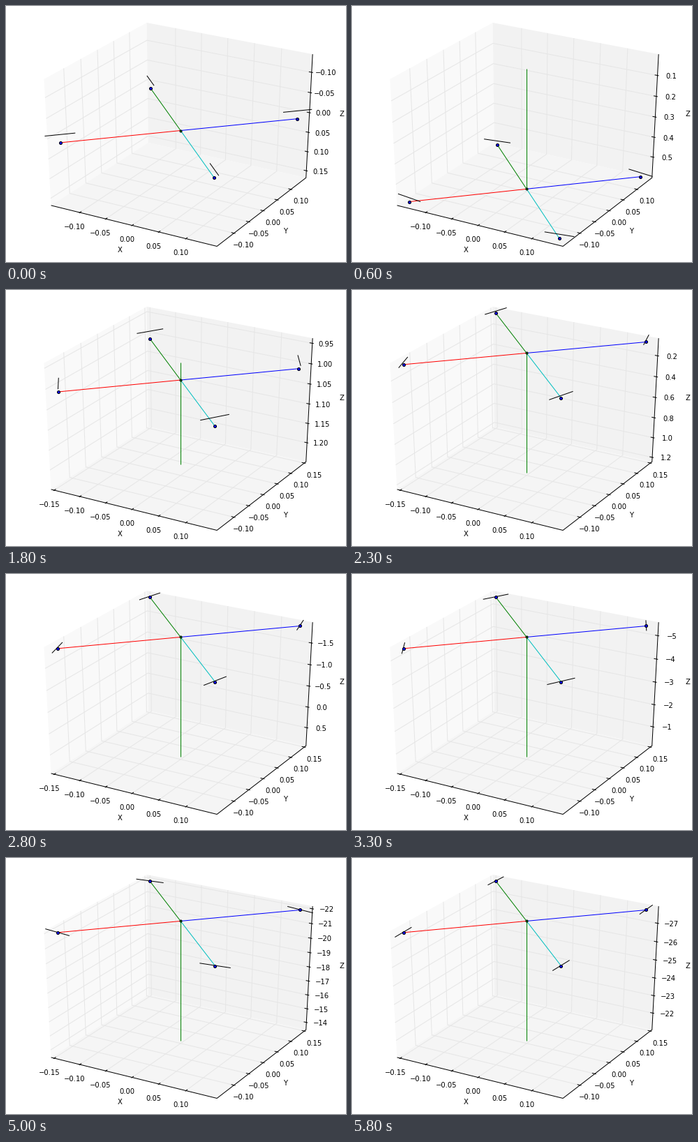
These frames come from a looping animation (487 px wide and 367 px high, 5.9 s). A matplotlib script:

```python
import numpy as np
import matplotlib.pyplot as plt
from matplotlib.animation import FuncAnimation

W, H = 487, 367
FRAMES, DT, TRAIL = 59, 0.05, 10
PX = 0.72                      # points per pixel at 100 dpi
LIMIT, ARM, BLADE, MAST = 0.15, 0.2, 0.025, 0.02
EDGE = 0.5 + 1 / 48            # half size of the box around the unit cube
LO, HI = -0.095, 0.09          # view window

plt.rcParams["font.family"] = "DejaVu Sans"
fig = plt.figure(figsize=(W / 100, H / 100), dpi=100, facecolor="white")
ax = fig.add_axes([0, 0, 1, 1])

# Flight: gravity pulls down (+z), the rotors push up.
SUB = 100
time = np.arange(0, (FRAMES + 1) * SUB) * DT / SUB
lift = np.interp(time,
                 [0, 0.30, 0.34, 0.70, 1.20, 1.70, 1.75, 2.02, 2.05],
                 [0, 0, 15.6, 18.5, 25, 45, 21, 14, 0])
impulse = np.cumsum(lift) * DT / SUB
height = np.cumsum(9.81 * time - impulse) * DT / SUB
steps = (np.arange(FRAMES) + 1) * SUB
zpos = height[steps]
count = np.arange(FRAMES)
trim = np.interp(count, [0, 13, 23, 33, 43], [0, 7, 0, -3, 0])
spin = np.radians(45 - 10.1 * count + 6.58 * impulse[steps] + trim)


def project(x, y, z):
    """Perspective view from elevation 30, azimuth -60, distance 10."""
    x, y, z = np.broadcast_arrays(x, y, z)
    az, el = np.radians(-60), np.radians(30)
    right = -np.sin(az) * x + np.cos(az) * y
    flat = np.cos(az) * x + np.sin(az) * y
    up = np.cos(el) * z - np.sin(el) * flat
    depth = 10 - np.cos(el) * flat - np.sin(el) * z
    return right / depth, up / depth


def line(x, y, z, color="k", width=1.0):
    ax.plot(*project(x, y, z), color=color, lw=width * PX,
            solid_capstyle="butt")


def dot(x, y, z, face, size):
    ax.plot(*project([x], [y], [z]), "o", ms=size * PX, mfc=face,
            mec="k", mew=PX)


def label(point, text, dx, dy):
    u, v = (float(c) for c in project(*point))
    ax.text(u + dx * (HI - LO) / W, v - (dy + 3.6) * (HI - LO) / H, text,
            fontsize=10 * PX, ha="center", va="baseline")


def caption(px, py, text):
    ax.text(px / W, 1 - (py + 3.6) / H, text, fontsize=10 * PX,
            ha="center", va="baseline", transform=ax.transAxes)


def number(value, digits):
    value = round(value, digits) + 0.0
    return f"{value:.{digits}f}".replace("-", "\u2212")


def ticks(lo, hi):
    """Round tick values with at most nine intervals."""
    raw = (hi - lo) / 9
    power = int(np.floor(np.log10(raw)))
    mult = next(m for m in (1, 2, 5, 10) if m * 10.0 ** power >= raw)
    step = mult * 10.0 ** power
    if mult == 10:
        power += 1
    first = int(np.ceil(lo / step - 1e-9))
    last = int(np.floor(hi / step + 1e-9))
    return [k * step for k in range(first, last + 1)], max(0, -power)


def draw_box(xs, ys, zs, digits, z_unit):
    e = EDGE
    panes = [
        ([-e, -e, -e, -e], [-e, e, e, -e], [-e, -e, e, e], 0.975),
        ([-e, e, e, -e], [e, e, e, e], [-e, -e, e, e], 0.95),
        ([-e, e, e, -e], [-e, -e, e, e], [-e, -e, -e, -e], 0.9625),
    ]
    for x, y, z, shade in panes:
        ax.fill(*project(x, y, z), color=str(shade), lw=0)

    for x in xs:
        line(x / 0.3, [-e, e, e], [-e, -e, e], "0.9")
    for y in ys:
        line([e, -e, -e], y / 0.3, [-e, -e, e], "0.9")
    for z in zs:
        line([e, -e, -e], [e, e, -e], z_unit(z), "0.9")

    line([-e, e, e, e], [-e, -e, e, e], [-e, -e, -e, e])

    out, inn = e + 0.1 / 12, e - 0.2 / 12
    for x in xs:
        u = x / 0.3
        line(u, [-out, -inn], -e)
        label((u, -e, -e), number(x, 2), -7.3, 20)
    for y in ys:
        u = y / 0.3
        line([inn, out], u, -e)
        label((e, u, -e), number(y, 2), 14, 17)
    for z in zs:
        u = z_unit(z)
        line([inn, out], e, u)
        label((e, e, u), number(z, digits), 20, 0.8)

    caption(163, 349, "X")
    caption(400, 322, "Y")
    caption(481, 154, "Z")


def draw(i):
    ax.clear()
    ax.set_axis_off()
    ax.set_xlim(LO, HI)
    ax.set_ylim(LO, HI)

    trail = zpos[max(0, i - TRAIL + 1):i + 1]
    mid = (trail.max() + trail.min()) / 2
    span = max(np.ptp(trail), 2 * LIMIT)

    def z_unit(z):
        return (mid - z) / span

    base = [-0.10, -0.05, 0.0, 0.05, 0.10]
    wide = i >= 7
    xs = [-LIMIT] + base if wide else base
    ys = base + [LIMIT] if wide else base
    zs, digits = ticks(mid - span / 2, mid + span / 2)
    draw_box(xs, ys, zs, digits, z_unit)

    line(0, 0, z_unit(np.array([trail.min(), trail.max()])), "g")

    z = z_unit(zpos[i])
    reach = ARM / np.sqrt(2) / 0.3
    blade = BLADE / 0.3
    arms = [(1, 1, "b"), (-1, 1, "g"), (-1, -1, "r"), (1, -1, "c")]
    for sx, sy, color in arms:
        x, y = sx * reach, sy * reach
        line([0, x], [0, y], z, color)
        angle = sx * sy * spin[i]
        c, s = blade * np.cos(angle), blade * np.sin(angle)
        line([x - c, x + c], [y - s, y + s], z + MAST / span)
        dot(x, y, z, "b", 4)
    dot(0, 0, z, "g", 3)
    return []


anim = FuncAnimation(fig, draw, frames=FRAMES, interval=100,
                     init_func=lambda: [], repeat=True, repeat_delay=0)
plt.show()
```
